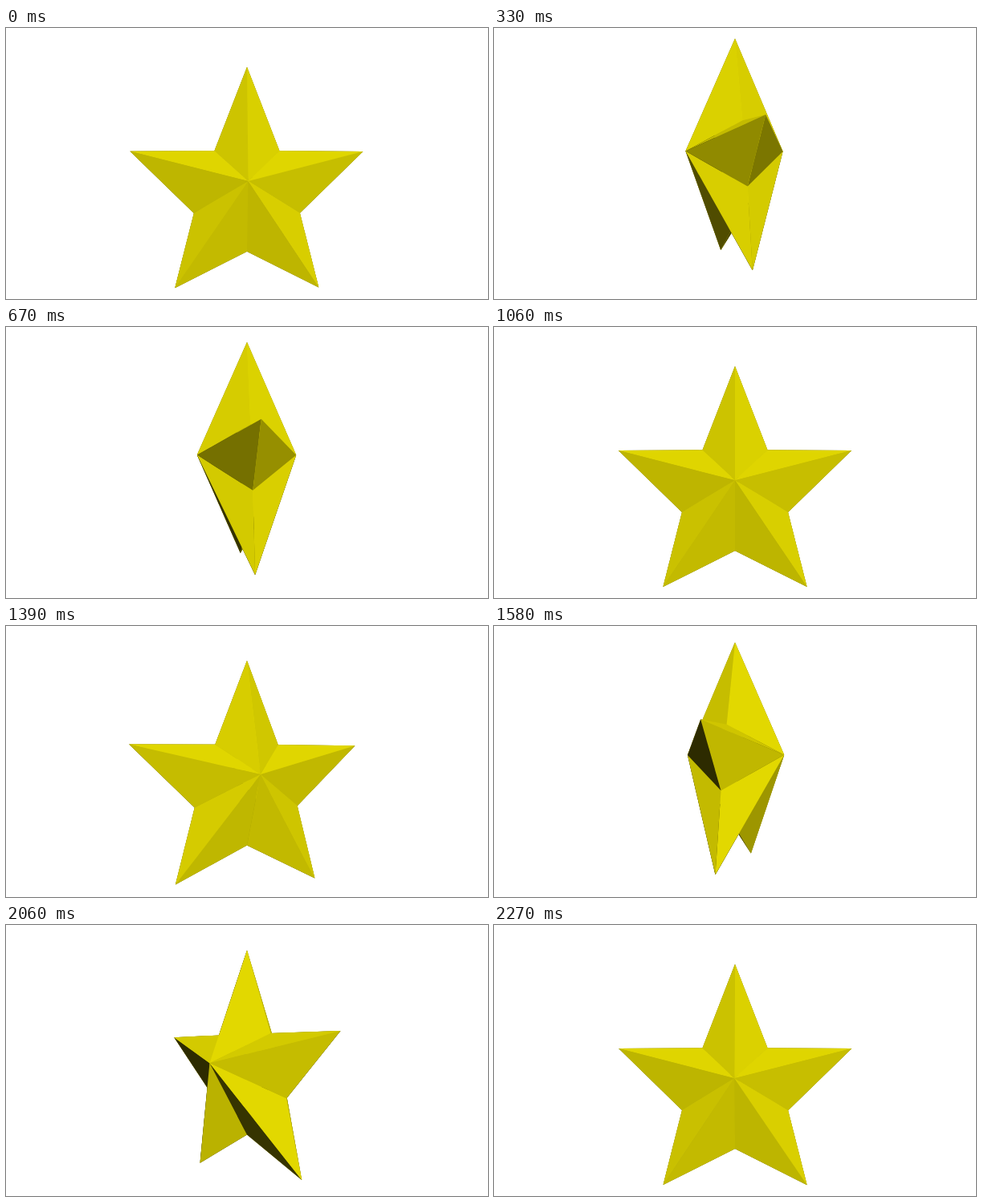
Write an HTML page without scripts that moves like this. It is 600 px wide and 338 px high and loops after 2300 ms.

```html
<!DOCTYPE html>
<html lang="en">
<head>
<meta charset="utf-8">
<title>Spinning star</title>
<style>
@property --t { syntax: "<number>"; inherits: true; initial-value: 0; }
@property --turn { syntax: "<number>"; inherits: true; initial-value: 0; }
@property --cos { syntax: "<number>"; inherits: true; initial-value: 1; }
@property --sin { syntax: "<number>"; inherits: true; initial-value: 0; }
@property --drop { syntax: "<number>"; inherits: true; initial-value: 0; }
@property --nx { syntax: "<number>"; inherits: true; initial-value: 0; }
@property --ny { syntax: "<number>"; inherits: true; initial-value: 0; }
@property --nz { syntax: "<number>"; inherits: true; initial-value: 1; }
@property --rz { syntax: "<number>"; inherits: true; initial-value: 1; }
@property --light { syntax: "<number>"; inherits: true; initial-value: 0; }
@property --shade { syntax: "<number>"; inherits: true; initial-value: 1; }

html, body { margin: 0; width: 100%; height: 100%; overflow: hidden; background: #fff; }

@keyframes clock { to { --t: 2300; } }

.star {
  --eye: 830;
  --peak: 62;
  /* two eased full turns, each with a hop */
  --turn: calc(180 * (2 - cos(180deg * clamp(0, (var(--t) + 40) / 1040, 1))
                        - cos(180deg * clamp(0, (var(--t) - 1258) / 1040, 1))));
  --hops: clamp(0, (var(--t) + 25) / 1000, 1) + clamp(0, (var(--t) - 1275) / 1000, 1);
  --drop: calc(20.6 - 22 * (1 - cos(360deg * (var(--hops)))));
  --cos: cos(var(--turn) * 1deg);
  --sin: sin(var(--turn) * 1deg);
  position: absolute;
  left: 0;
  top: 0;
  width: 600px;
  height: 338px;
  isolation: isolate;
  filter: drop-shadow(0 0 .5px #2a2600a0);
  animation: clock 2300ms steps(76) -5ms infinite;
}

/* quarters: mirrored left/right and front/back */
.star b { display: contents; --side: 1; --face: 1; }
.star b:nth-child(even) { --side: -1; }
.star b:nth-child(n+3) { --face: -1; }

/* rim edge of each facet, clockwise, measured from the middle */
i:nth-child(1) { --px: 0;    --py: -140.6; --qx: 40.5; --qy: -36; }
i:nth-child(2) { --px: 40.5; --py: -36;    --qx: 145;  --qy: -35.5; }
i:nth-child(3) { --px: 145;  --py: -35.5;  --qx: 66;   --qy: 41.5; }
i:nth-child(4) { --px: 66;   --py: 41.5;   --qx: 89.5; --qy: 134.5; }
i:nth-child(5) { --px: 89.5; --py: 134.5;  --qx: 0;    --qy: 89.5; }

.star i {
  position: absolute;
  inset: 0;

  /* facet normal, then its turned depth */
  --cross: (var(--px) * var(--qy) - var(--py) * var(--qx));
  --ex: (var(--peak) * (var(--qy) - var(--py)));
  --ey: (var(--peak) * (var(--px) - var(--qx)));
  --len: hypot(var(--ex), var(--ey), var(--cross));
  --nx: calc(var(--ex) / var(--len) * var(--side));
  --ny: calc(var(--ey) / var(--len));
  --nz: calc(var(--cross) / var(--len));
  --rz: calc(var(--nz) * var(--face) * var(--cos) - var(--nx) * var(--sin));

  --light: calc(.15 * (var(--nx) * var(--cos) + var(--nz) * var(--face) * var(--sin))
              - .5 * var(--ny) + .85 * max(var(--rz), -1 * var(--rz)));
  --shade: clamp(.2, min(.36 + 1.5 * var(--light), .73 + .3 * var(--light)), 1);
  background: rgb(calc(226 * var(--shade)) calc(216 * var(--shade)) 0);

  /* facets turned away go behind, the rest sort by depth */
  --facing: (var(--rz) - (var(--ny) * var(--drop) + var(--nz) * var(--peak)) / var(--eye));
  z-index: calc(clamp(-1000, 100000 * var(--facing), 1000)
              - (var(--px) + var(--qx)) * var(--side) * var(--sin));

  /* perspective projection of the three corners */
  --az: (var(--peak) * var(--face));
  --as: (var(--eye) / (var(--eye) - var(--az) * var(--cos)));
  --ps: (var(--eye) / (var(--eye) + var(--px) * var(--side) * var(--sin)));
  --qs: (var(--eye) / (var(--eye) + var(--qx) * var(--side) * var(--sin)));
  clip-path: polygon(
    calc(1px * (300 + var(--az) * var(--sin) * var(--as)))
    calc(1px * (169 + var(--drop) * var(--as))),
    calc(1px * (300 + var(--px) * var(--side) * var(--cos) * var(--ps)))
    calc(1px * (169 + (var(--py) + var(--drop)) * var(--ps))),
    calc(1px * (300 + var(--qx) * var(--side) * var(--cos) * var(--qs)))
    calc(1px * (169 + (var(--qy) + var(--drop)) * var(--qs))));
}
</style>
</head>
<body>
<div class="star">
  <b><i></i><i></i><i></i><i></i><i></i></b>
  <b><i></i><i></i><i></i><i></i><i></i></b>
  <b><i></i><i></i><i></i><i></i><i></i></b>
  <b><i></i><i></i><i></i><i></i><i></i></b>
</div>
</body>
</html>
```
